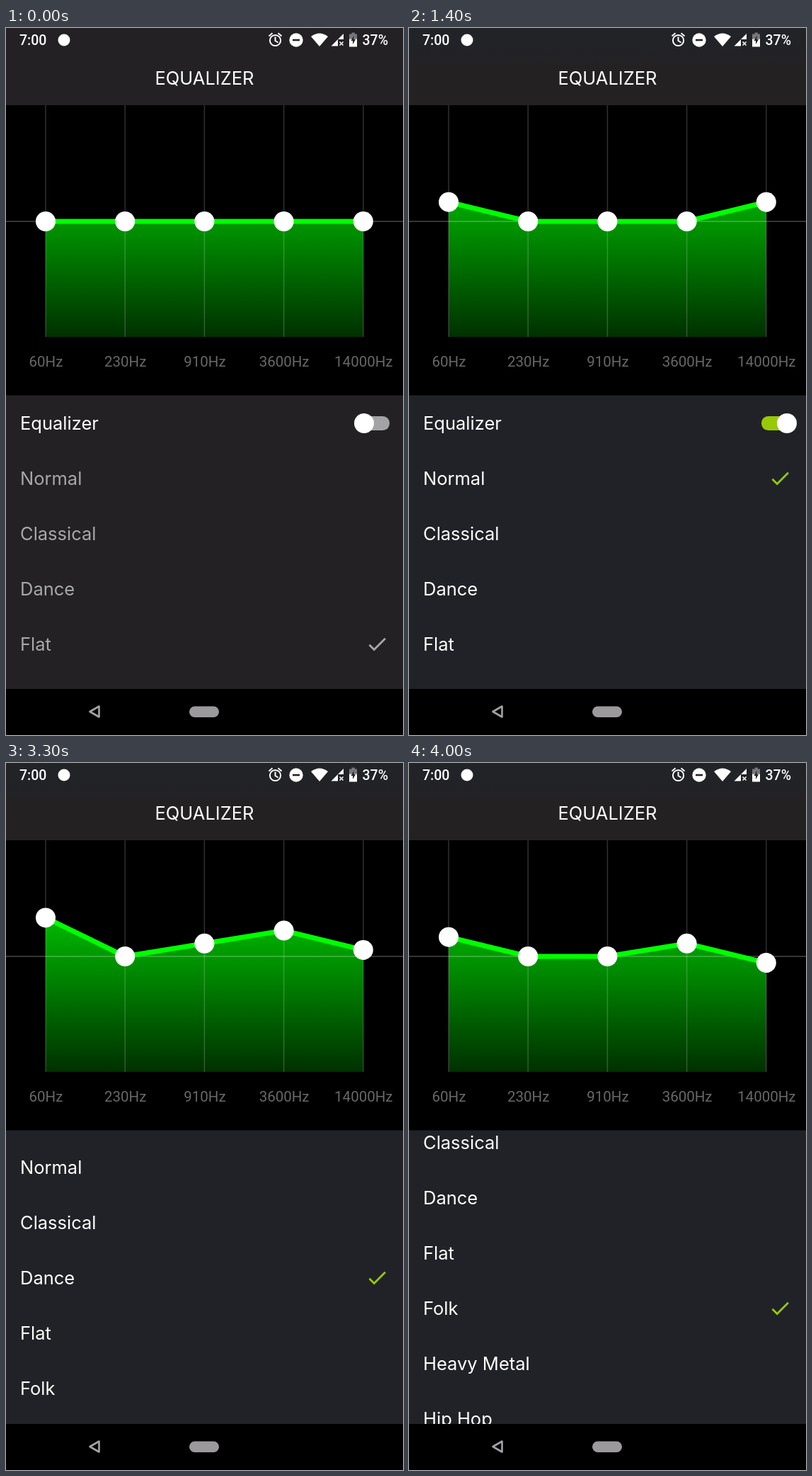
An HTML page that plays this animation: 561 by 998 pixels, repeating every 4500 ms.

```html
<!DOCTYPE html>
<html lang="en">
<head>
<meta charset="utf-8">
<title>Equalizer</title>
<style>
  html, body { margin: 0; width: 100%; height: 100%; overflow: hidden; background: #000; }
  svg { display: block; width: 100vw; height: 100vh; }
  .title, .row { font: 400 25.5px Inter, sans-serif; fill: #fff; }
  .status { font: 500 19.5px Roboto, sans-serif; fill: #fff; }
  .hz { font: 400 20.5px Roboto, sans-serif; fill: #686868; }
  .mid { text-anchor: middle; }
  .panel { fill: #232124; }
  .preset { fill: #a8a7a9; }
  .check { fill: #a8a7a9; }
  .track { fill: #a3a2a4; }
  .on .panel { fill: #212227; }
  .on .header { fill: url(#headerTint); }
  .on .preset { fill: #fff; }
  .on .check, .on .track { fill: #97c908; }
</style>
</head>
<body>
<svg id="stage" viewBox="0 0 561 998">
  <defs>
    <linearGradient id="glow" gradientUnits="userSpaceOnUse" x1="0" y1="109" x2="0" y2="436">
      <stop offset="0" stop-color="#0f0"/>
      <stop offset="1" stop-color="#003000"/>
    </linearGradient>
    <linearGradient id="headerTint" x1="0" y1="0" x2="0" y2="1">
      <stop offset=".2" stop-color="#212327"/>
      <stop offset=".5" stop-color="#242123"/>
    </linearGradient>
    <clipPath id="listClip"><rect y="518" width="561" height="415"/></clipPath>
  </defs>

  <rect width="561" height="998"/>
  <rect class="panel header" width="561" height="109"/>
  <rect class="panel" y="518.5" width="561" height="414.5"/>

  <!-- status bar -->
  <text class="status" x="19" y="24">7:00</text>
  <circle cx="82" cy="17" r="8.5" fill="#fff"/>
  <g fill="none" stroke="#fff" stroke-width="2">
    <circle cx="380.5" cy="17.5" r="7.6"/>
    <path d="M380.5 12.5V18l4 2.5M371.5 11.5l5-4.2M389.5 11.5l-5-4.2"/>
  </g>
  <circle cx="410" cy="17" r="9.7" fill="#fff"/>
  <path d="M405 17h10" stroke="#232124" stroke-width="2.6"/>
  <path d="M431 12Q443 3 455 12L443 26Z" fill="#fff"/>
  <path d="M477 8V16H469V25.5H459.5Z" fill="#fff"/>
  <path d="M471.5 19.5l5 5m0-5l-5 5" stroke="#fff" stroke-width="1.6"/>
  <path d="M488.5 6.5h4.5v2h3v7h-11v-7h3.5z" fill="#77767a"/>
  <path d="M485 15.500h11V26.500h-11z" fill="#fff"/>
  <path d="M491.500 11l-4 7h2.500v5l4-7h-2.500z" fill="#232124"/>
  <text class="status" x="503.500" y="24">37%</text>

  <text class="title mid" x="280.5" y="80">EQUALIZER</text>

  <!-- chart -->
  <path id="area" fill="url(#glow)"/>
  <path d="M0 273H561" stroke="#fff" stroke-opacity=".28" stroke-width="1.4"/>
  <g id="grid" stroke="#fff" stroke-opacity=".19" stroke-width="1.5"></g>
  <path id="curve" fill="none" stroke="#0f0" stroke-width="7"/>
  <g id="knobs" fill="#fff"></g>
  <g id="bands" class="hz mid"></g>

  <!-- list -->
  <g clip-path="url(#listClip)">
    <g id="list">
      <rect class="track" x="498" y="548" width="44" height="20" rx="9.5"/>
      <circle id="thumb" cx="506" cy="558" r="14" fill="#fff"/>
      <path id="check" class="check" d="M9 16.17L4.83 12l-1.42 1.41L9 19 21 7l-1.41-1.41z"/>
    </g>
  </g>

  <!-- navigation bar -->
  <path d="M131.500 957.500V972.500L118.500 965Z" fill="none" stroke="#a3a1a4" stroke-width="2.6" stroke-linejoin="round"/>
  <rect x="259" y="957.500" width="42" height="15.500" rx="7.750" fill="#9b999c"/>
</svg>
<script>
const LOOP = 4500, ROW = 78, ZERO_Y = 273, DB = 9.1;
const bands = ['60Hz', '230Hz', '910Hz', '3600Hz', '14000Hz'];
const rows = ['Equalizer', 'Normal', 'Classical', 'Dance', 'Flat', 'Folk', 'Heavy Metal', 'Hip Hop'];
const gains = {
  Flat: [0, 0, 0, 0, 0],
  Normal: [3, 0, 0, 0, 3],
  Classical: [5, 3, -2, 4, 4],
  Dance: [6, 0, 2, 4, 1],
  Folk: [3, 0, 0, 2, -1]
};
// [start in ms, value], held until the next entry
const selection = [[0, 'Flat'], [1400, 'Normal'], [2000, 'Classical'], [2700, 'Dance'], [4000, 'Folk']];
const scroll = [[0, 0], [3300, 65], [3400, 120], [3500, 157], [3600, 178]];

const byId = id => document.getElementById(id);
const bandX = i => 56 + i * 112.2;
const valueAt = (track, t) => track.filter(([start]) => start <= t).pop()[1];

function add(parent, tag, attrs, text = '') {
  const el = document.createElementNS('http://www.w3.org/2000/svg', tag);
  for (const key in attrs) el.setAttribute(key, attrs[key]);
  el.textContent = text;
  return byId(parent).appendChild(el);
}

bands.forEach((label, i) => {
  add('grid', 'path', { d: `M${bandX(i)} 109V436` });
  add('bands', 'text', { x: bandX(i) + 0.5, y: 478 }, label);
});
const knobs = bands.map((_, i) => add('knobs', 'circle', { cx: bandX(i), r: 14 }));
rows.forEach((label, i) => {
  add('list', 'text', { class: i ? 'row preset' : 'row', x: 20, y: 567 + i * ROW }, label);
});

function thumbProgress(t) {
  const step = Math.floor((t - 400) / 100);
  const p = Math.min(1, Math.max(0, step / 5));
  return (1 - Math.cos(Math.PI * p)) / 2;
}

function draw(t) {
  const preset = valueAt(selection, t);
  const ys = gains[preset].map(g => ZERO_Y - g * DB);
  const line = 'M' + ys.map((y, i) => `${bandX(i)} ${y}`).join('L');
  byId('curve').setAttribute('d', line);
  byId('area').setAttribute('d', `${line}V436H${bandX(0)}Z`);
  knobs.forEach((knob, i) => knob.setAttribute('cy', ys[i]));

  byId('stage').classList.toggle('on', t >= 500);
  byId('thumb').setAttribute('cx', 506 + 28 * thumbProgress(t));
  byId('list').setAttribute('transform', `translate(0 ${-valueAt(scroll, t)})`);
  const checkY = 541 + rows.indexOf(preset) * ROW;
  byId('check').setAttribute('transform', `translate(507.7 ${checkY}) scale(1.39)`);
}

function tick() {
  draw(performance.now() % LOOP);
  requestAnimationFrame(tick);
}
tick();
</script>
</body>
</html>
```
